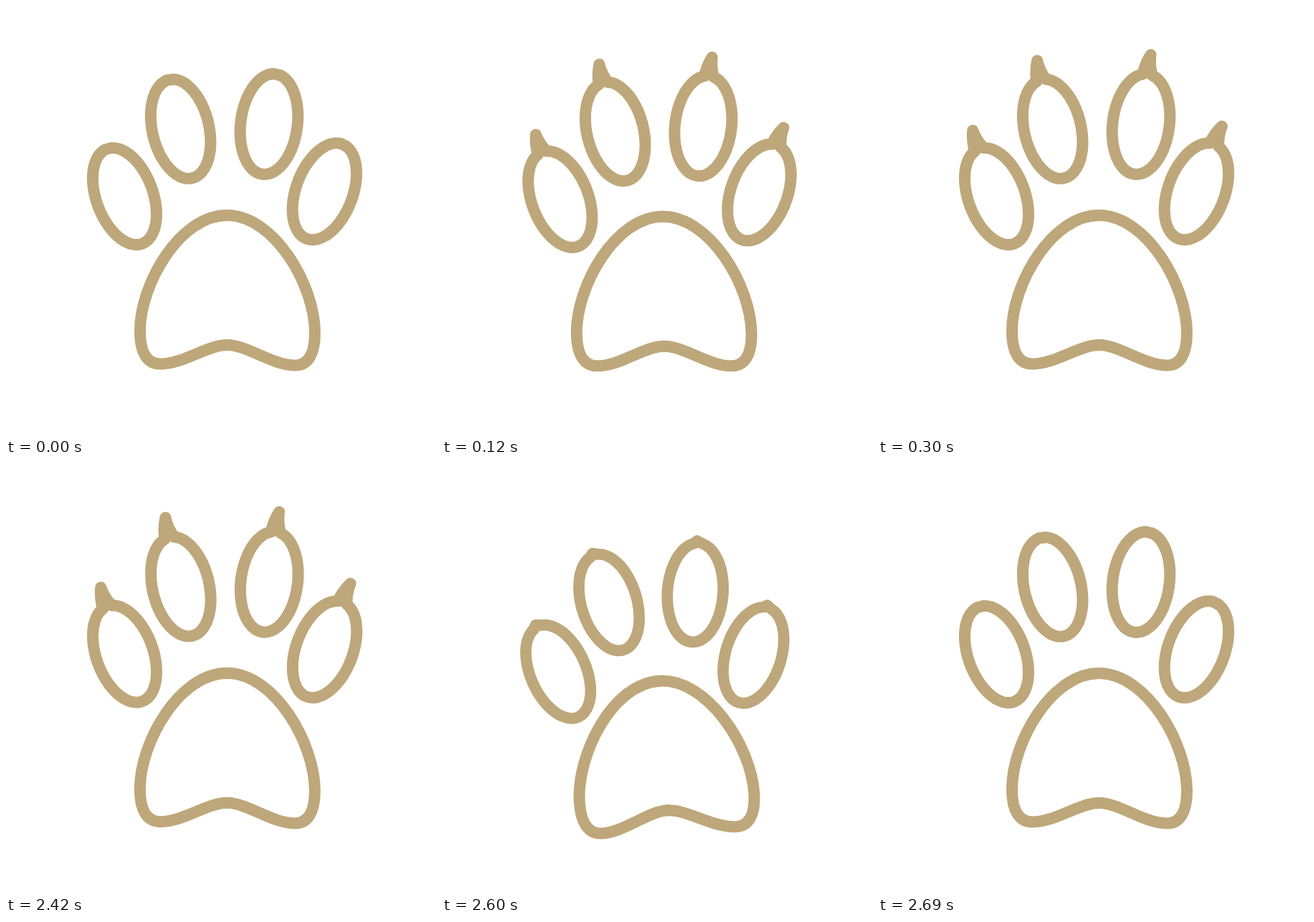
An HTML page that plays this animation: 600 by 600 pixels, repeating every 3.22 s.

```html
<!DOCTYPE html>
<html lang="en">
<head>
<meta charset="utf-8">
<title>Paw with claws</title>
<style>
  html, body { margin: 0; width: 100%; height: 100%; overflow: hidden; background: #fff; }
  svg { display: block; width: 100%; height: 100%; }
  path { fill: none; stroke: #bea77a; stroke-width: 16; stroke-linejoin: round; stroke-linecap: round; }
</style>
</head>
<body>
<svg viewBox="0 0 600 600">
  <defs>
    <path id="half" d="M0 292C66 292 122 389 122 455C122 485 112 500.5 94 500.5C62 500.5 28 473 0 473"/>
    <path id="toe"/>
  </defs>
  <g id="paw">
    <g transform="translate(309) skewY(.6)">
      <use href="#half"/>
      <use href="#half" transform="scale(-1 1)"/>
    </g>
    <g id="toes">
      <use href="#toe" transform="translate(165.5 265.5) rotate(-20.4)"/>
      <use href="#toe" transform="translate(243.7 171.5) rotate(-13.2)"/>
      <use href="#toe" transform="translate(367 164.8) rotate(7.5)"/>
      <use href="#toe" transform="translate(444.4 258.8) rotate(20.8)"/>
    </g>
  </g>
</svg>
<script>
const LOOP = 3220, STEP = 30, STEPS = 10, RETRACT = 2420;

const poses = [
  { at: 0, crouch: 0, claw: 0 },
  { at: 0.25, crouch: 1.113, claw: 0 },
  { at: 0.5, crouch: -0.265, claw: 1.43 },
  { at: 1, crouch: 0, claw: 1 }
];

const [paw, toes, toe] = ["paw", "toes", "toe"].map(id => document.getElementById(id));
const mix = (a, b, t) => a + (b - a) * t;
const ease = t => t < 0.5 ? 2 * t * t : 1 - 2 * (1 - t) ** 2;

function poseAt(p) {
  const i = Math.max(1, poses.findIndex(pose => pose.at >= p));
  const a = poses[i - 1], b = poses[i];
  const t = ease((p - a.at) / (b.at - a.at));
  return { crouch: mix(a.crouch, b.crouch, t), claw: mix(a.claw, b.claw, t) };
}

// An upright ellipse, open at the top, closed by a slightly hooked claw
function toePath(claw) {
  const rx = 39.6, ry = 70.6, base = 6.5;
  const baseY = -ry * Math.sqrt(1 - (base / rx) ** 2);
  const tipX = 3.8 * claw - 3, tipY = -ry - 27 * claw;
  const bend = side => `${(side * base + tipX) / 2 - 3 * claw} ${(baseY + tipY) / 2}`;
  return `M${base} ${baseY}A${rx} ${ry} 0 1 1 ${-base} ${baseY}` +
    `Q${bend(-1)} ${tipX} ${tipY}Q${bend(1)} ${base} ${baseY}Z`;
}

// Movement runs in even steps: out at the start, back from RETRACT
function progress(t) {
  const back = t >= RETRACT;
  const step = Math.floor(back ? (t - RETRACT) / STEP + 1 : t / STEP);
  const p = Math.min(STEPS, step) / STEPS;
  return back ? 1 - p : p;
}

const start = performance.now();

function draw(now) {
  const { crouch, claw } = poseAt(progress(Math.max(0, now - start) % LOOP));
  paw.setAttribute("transform", `translate(0 ${10.5 * crouch}) rotate(${-3.44 * crouch} 309 378)`);
  toes.setAttribute("transform", `translate(309 520) scale(${1 - 0.02 * crouch}) translate(-309 -520)`);
  toe.setAttribute("d", toePath(claw));
  requestAnimationFrame(draw);
}
draw(start);
</script>
</body>
</html>
```
